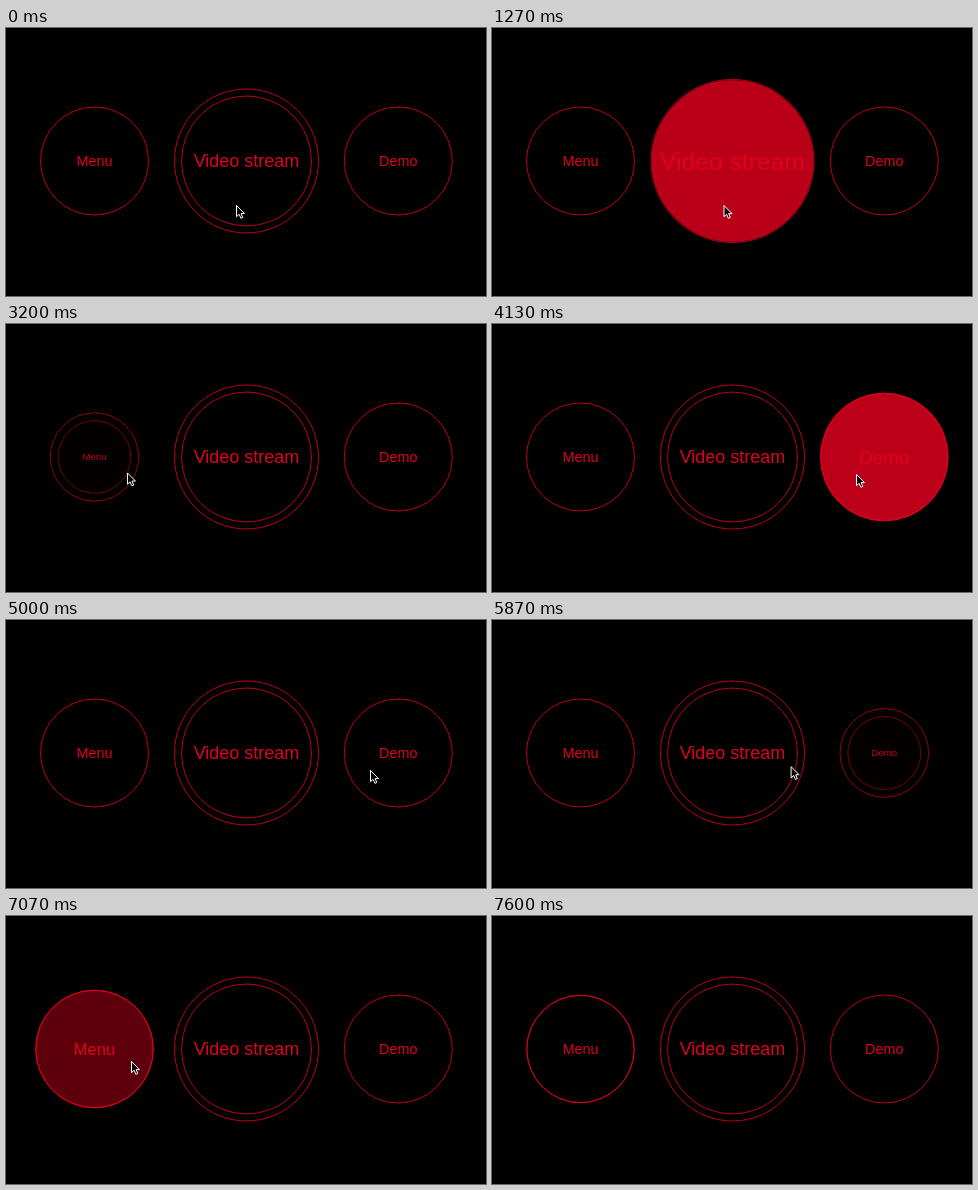
Write an HTML page that moves like this. It is 480 by 268 pixels and loops after 8070 ms.

```html
<!DOCTYPE html>
<html lang="en">
<head>
<meta charset="utf-8">
<title>Round menu</title>
<style>
  html, body { margin: 0; width: 100%; height: 100%; overflow: hidden; background: #000; }
  svg { display: block; width: 100%; height: 100%; }
  text { font-family: "Liberation Sans", Arial, sans-serif; text-anchor: middle; fill: #e1001e; }
  circle { fill: none; stroke: #e1001e; }
</style>
</head>
<body>
<svg id="stage" viewBox="0 0 480 268"></svg>
<script>
const LOOP = 8070, GROW = 380, DROP = 215, BACK = 270, CY = 133;
const stage = document.getElementById('stage');

// Sizes are [shrunk, resting, pressed]; presses are [down, up] in ms.
const side = { outer: [44.2, 54, 65], inner: [36.3, 54, 65.5], text: [9.6, 14.4, 19.5], glow: 0.015 };
const buttons = [
  { label: 'Menu', x: 88.5, ...side, presses: [[2400, 2985], [6900, 7140]] },
  { label: 'Video stream', x: 240.5, outer: [59.5, 72, 86], inner: [45, 65, 87.5],
    text: [12.4, 18, 27.8], glow: 0.08, presses: [[315, 1185], [5890, 6185]] },
  { label: 'Demo', x: 392.3, ...side, presses: [[3840, 4455], [5315, 5640]] }
];

// Pointer path: [ms, x, y]
const path = [
  [0, 230, 177], [70, 230.5, 177], [130, 231.5, 177], [2030, 231.5, 177], [2070, 216.5, 176.5],
  [2380, 114, 150], [2920, 114, 150], [3200, 120.5, 148.5], [3730, 364, 150], [5350, 364, 150],
  [5640, 330, 148], [5890, 296, 146], [6200, 167, 142], [6400, 153, 139.5], [6670, 125, 145],
  [7140, 125, 145], [7590, 424, 272]
];

function add(tag, attrs) {
  const el = document.createElementNS('http://www.w3.org/2000/svg', tag);
  set(el, attrs);
  stage.appendChild(el);
  return el;
}
function set(el, attrs) {
  for (const key in attrs) el.setAttribute(key, attrs[key]);
}
const clamp = v => Math.min(1, Math.max(0, v));
const mix = (a, b, u) => a + (b - a) * u;
const smooth = u => u * u * (3 - 2 * u);
const sized = ([low, rest, high], p) => p < 0 ? mix(rest, low, -p) : mix(rest, high, p);

for (const b of buttons) {
  const ring = { cx: b.x, cy: CY };
  b.ring = add('circle', ring);
  b.disc = add('circle', ring);
  b.disc.style.fill = '#e1001e';
  b.name = add('text', { x: b.x });
  b.name.textContent = b.label;
}
const pointer = add('path', {
  d: 'M0 0V11.2L2.6 8.8 4.4 12.8 6.3 12 4.6 8.1H8Z',
  fill: '#000', stroke: '#fff', 'stroke-width': 1, 'stroke-linejoin': 'round'
});

// p: -1 shrunk, 0 resting, 1 pressed; fill: opacity of the disc
function stateAt(b, t) {
  for (const [down, up] of b.presses) {
    if (t < down || t >= up + DROP + BACK) continue;
    const peak = smooth(clamp((Math.min(t, up) - down) / GROW));
    if (t < up) return { p: peak, fill: peak * 0.97 };
    const u = (t - up) / DROP;
    if (u <= 1) {
      return { p: mix(peak, -1, u * u), fill: mix(peak * 0.97, b.glow, u * u) };
    }
    const rest = 1 - smooth(clamp((t - up - DROP) / BACK));
    return { p: -rest, fill: b.glow * rest };
  }
  return { p: 0, fill: 0 };
}

function drawButton(b, t) {
  const { p, fill } = stateAt(b, t);
  const dim = Math.max(0, -p);
  const size = sized(b.text, p);
  set(b.ring, { r: sized(b.outer, p), 'stroke-opacity': 0.84 - 0.2 * dim });
  // Equal rings at rest count as one line.
  const twin = b.outer[1] === b.inner[1] && p === 0;
  set(b.disc, {
    r: sized(b.inner, p),
    'fill-opacity': fill,
    'stroke-opacity': twin ? 0 : 0.84 - 0.34 * dim
  });
  set(b.name, { y: CY + size * 0.36, 'font-size': size, opacity: 1 - 0.12 * dim });
}

function drawPointer(t) {
  const i = path.findIndex(k => k[0] > t);
  pointer.style.display = i < 0 ? 'none' : '';
  if (i < 0) return;
  const [t0, x0, y0] = path[i - 1], [t1, x1, y1] = path[i];
  const u = (t - t0) / (t1 - t0);
  set(pointer, { transform: `translate(${mix(x0, x1, u) + 0.5} ${mix(y0, y1, u) + 0.5})` });
}

function draw(t) {
  for (const b of buttons) drawButton(b, t);
  drawPointer(t);
}

const start = performance.now();
function tick() {
  draw((performance.now() - start) % LOOP);
  requestAnimationFrame(tick);
}
tick();
</script>
</body>
</html>
```
